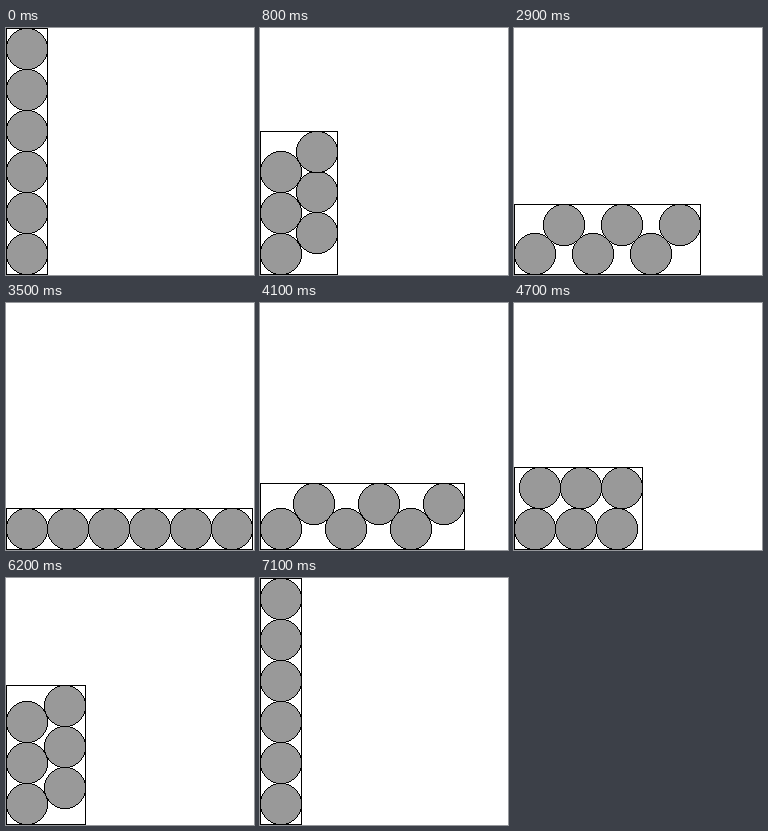
Recreate the animation shown at these times as an HTML page. Size 248x247 px, loop 7200 ms.

```html
<!DOCTYPE html>
<html lang="en">
<head>
<meta charset="utf-8">
<title>Six circles in a rectangle</title>
<style>
  html, body { margin: 0; width: 100%; height: 100%; overflow: hidden; background: #fff; }
  svg { display: block; shape-rendering: crispEdges; }
</style>
</head>
<body>
<svg width="248" height="247" viewBox="0 0 248 247">
  <defs>
    <g id="disc"><path id="rim"/><path id="face" fill="#999"/></g>
  </defs>
  <rect id="box" x=".5" fill="none" stroke="#000"/>
  <g id="discs"></g>
</svg>
<script>
const SIZE = 41, BASE = 246, LAST = 35, STEP_MS = 100;
const $ = id => document.getElementById(id);
const six = [0, 1, 2, 3, 4, 5];

// A hard-edged disc, built from one horizontal run per pixel row.
const radius = SIZE / 2;
const inside = (x, y) =>
  Math.hypot(Math.max(x, y) - 0.5, Math.min(x, y)) <= radius;
function halfRun(y) {
  let n = 0;
  while (inside(n + 0.5, Math.abs(y))) n++;
  return n;
}
function buildDisc() {
  let rim = '', face = '';
  const run = (y, n) => n > 0 ? `M${-n} ${y - 0.5}h${2 * n}v1h${-2 * n}z` : '';
  for (let y = -radius; y <= radius; y++) {
    const n = halfRun(y);
    rim += run(y, n);
    face += run(y, Math.min(n - 1, halfRun(y - 1), halfRun(y + 1)));
  }
  $('rim').setAttribute('d', rim);
  $('face').setAttribute('d', face);
}

// Disc offsets from the bottom left corner, in diameters.
function layout(step) {
  if (step > LAST / 2) return layout(LAST - step).map(([x, y]) => [y, x]);
  const turn = steps => {
    const a = steps * 7.5 * Math.PI / 180;
    return [Math.sin(a), Math.cos(a)];
  };
  if (step <= 8) { // column folds into a zigzag
    const [s, c] = turn(step);
    return six.map(i => [i % 2 * s, i * c]);
  }
  if (step <= 12) { // right column sinks into a grid
    const [s, c] = turn(12 - step);
    return six.map(i => [i % 2 * c, (i >> 1) + i % 2 * s]);
  }
  if (step <= 16) { // middle row slides right
    const [s, c] = turn(step - 12);
    return six.map(i => [i % 2 + (i >> 1) % 2 * s, (i >> 1) * c]);
  }
  const [s, c] = turn(4 + 1 / 3); // rows spread apart
  return six.map(i => [(i % 2 * 2 + (i >> 1) % 2) * s, (i >> 1) * c]);
}

const snap = v => Math.round(40.98 * v + 0.04);

const discs = six.map(() => {
  const use = document.createElementNS('http://www.w3.org/2000/svg', 'use');
  use.setAttribute('href', '#disc');
  return $('discs').appendChild(use);
});

function draw(time) {
  const tick = Math.floor(time / STEP_MS) % (2 * LAST + 2);
  const spots = layout(Math.min(tick, 2 * LAST + 1 - tick))
    .map(spot => spot.map(snap));
  const width = SIZE + Math.max(...spots.map(p => p[0]));
  const height = SIZE + Math.max(...spots.map(p => p[1]));
  $('box').setAttribute('y', BASE - height + 0.5);
  $('box').setAttribute('width', width);
  $('box').setAttribute('height', height);
  spots.forEach(([x, y], i) =>
    discs[i].setAttribute('transform', `translate(${x + 21} ${BASE - y - 20})`));
}

function loop(now) {
  draw(now);
  requestAnimationFrame(loop);
}

buildDisc();
draw(0);
requestAnimationFrame(loop);
</script>
</body>
</html>
```
